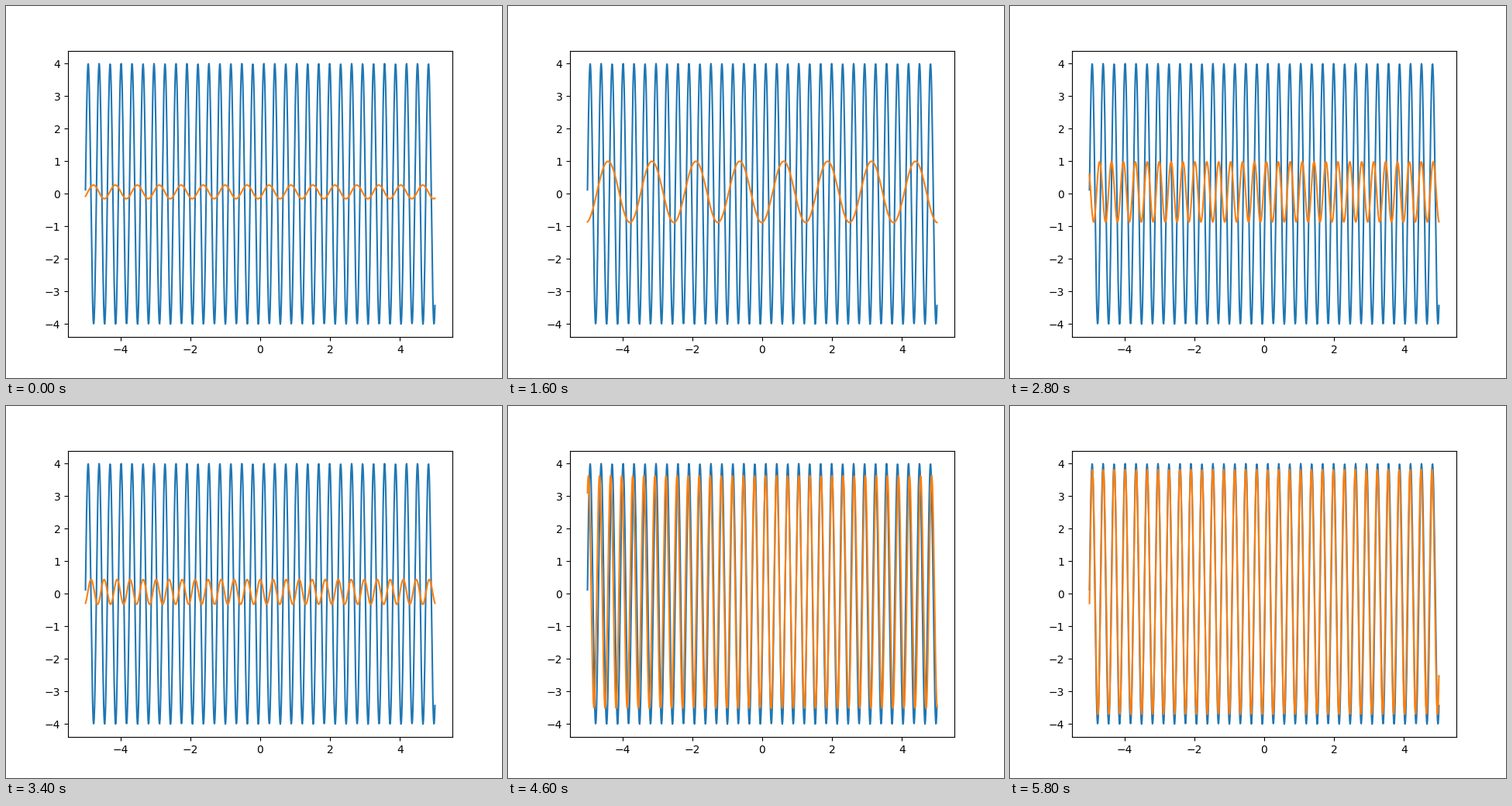
Animation of 640 by 480 pixels, one loop 6 s. Source, as a matplotlib script:

```python
import numpy as np
import matplotlib.pyplot as plt
from matplotlib.animation import FuncAnimation

FRAMES = 30
INTERVAL = 200
OFFSET = 0.06

# Key poses of the fitted wave: step -> amplitude, frequency, phase
POSES = {
    0: (0.21, 10, -0.96),
    8: (0.94, 5, -1.5),
    11: (1.47, 19.975, -0.765),
    17: (0.38, 16.88, np.pi / 2),
    23: (3.57, 19.83, -0.36),
    26: (3.19, 20.277, -0.795),
    29: (3.76, 20.04, -0.425),
}

x = np.linspace(-5, 5, 1000)


def wave(amp, freq, phase, offset=0.0):
    return amp * np.sin(freq * x + phase) + offset


def pose(step):
    """Ease from the last key pose towards the next one."""
    start = max(k for k in POSES if k <= step)
    end = min(k for k in POSES if k >= step)
    u = (step - start) / max(end - start, 1)
    ease = (1 - np.cos(np.pi * u)) / 2
    a, b = np.array(POSES[start]), np.array(POSES[end])
    return a + (b - a) * ease


fig, ax = plt.subplots(figsize=(6.4, 4.8), dpi=100)
ax.plot(x, wave(4, 20, -0.5))
fit, = ax.plot(x, wave(*pose(0), OFFSET))
ax.set_xlim(-5.5, 5.5)
ax.set_ylim(-4.4, 4.4)


def update(step):
    fit.set_ydata(wave(*pose(step), OFFSET))
    return fit,


anim = FuncAnimation(fig, update, frames=FRAMES, interval=INTERVAL,
                     repeat=True, repeat_delay=0)
plt.show()
```
